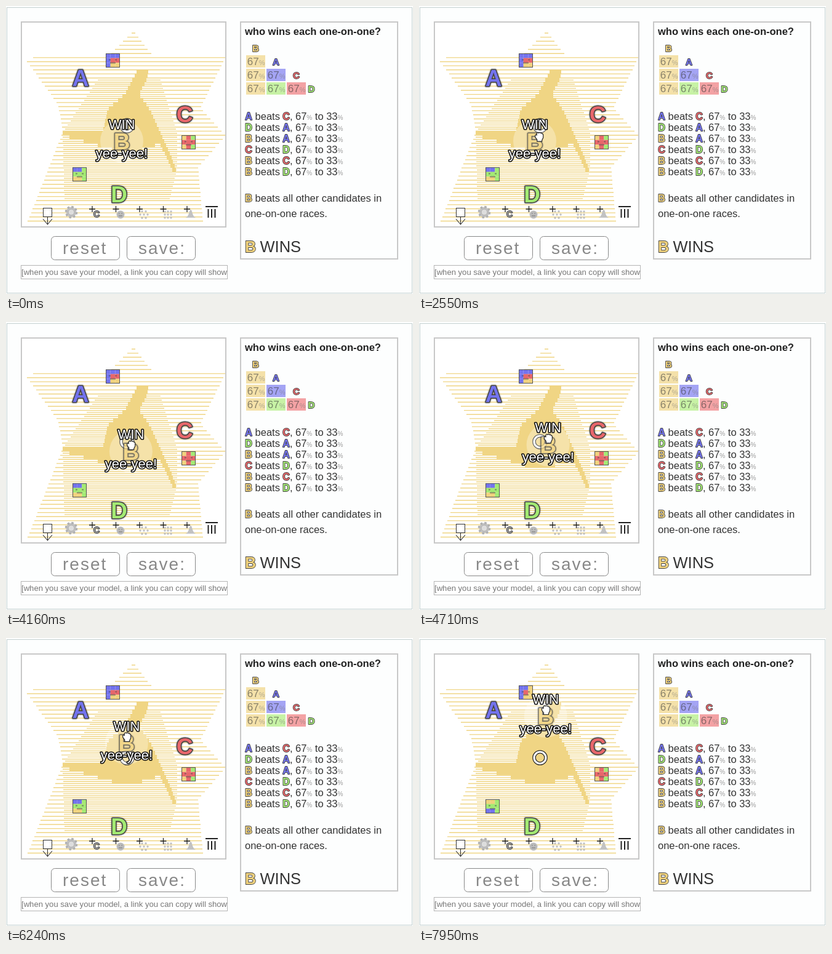
These frames come from a looping animation (661x468 px, 8000 ms). An HTML page:

```html
<!DOCTYPE html>
<html lang="en">
<head>
<meta charset="utf-8">
<title>One-on-one races</title>
<style>
  html, body { margin: 0; width: 100%; height: 100%; overflow: hidden; background: #fdfefe; }
  svg { display: block; width: 661px; height: 468px; }
  text { font-family: "Liberation Sans", Arial, sans-serif; font-size: 16.5px; fill: #333; white-space: pre; }
  .mark { font-weight: bold; stroke: #444; paint-order: stroke; stroke-linejoin: round; text-anchor: middle; }
  .big { filter: drop-shadow(0 0 1px #0008); }
  .note { font-size: 22px; fill: #fff; stroke: #111; stroke-width: 3.2px; paint-order: stroke; stroke-linejoin: round; text-anchor: middle; }
  .pct { font-size: 10px; fill: #999; }
  .cell { font-size: 17px; text-anchor: end; }
  .cell .pct { font-size: 11px; fill: #777; }
  .btn text { font-size: 28px; letter-spacing: 2px; fill: #888; }
  .btn rect { fill: #fff; stroke: #888; }
  .btn.hover text { fill: #555; }
  .btn.hover rect { stroke: #555; }
</style>
</head>
<body>
<svg id="stage" viewBox="0 0 661 468"></svg>
<script>
const LOOP = 8000, TICK = 134.7, GRAB = 3700, ROW = 6.64;
const COLOR = { A: '#7373ee', B: '#f0d27d', C: '#e8676b', D: '#a3ea73' };
const PALE = { A: '#a4a4f4', B: '#f4e1a9', C: '#f3a2a4', D: '#c7f2a5' };
const stage = document.getElementById('stage');

function el(name, attrs = {}, parent = stage, text) {
  const node = document.createElementNS('http://www.w3.org/2000/svg', name);
  for (const k in attrs) node.setAttribute(k, attrs[k]);
  if (text !== undefined) node.textContent = text;
  parent.appendChild(node);
  return node;
}
const group = (attrs, parent) => el('g', attrs, parent);
const box = (x, y, width, height, fill, parent, more) =>
  el('rect', { x, y, width, height, fill, ...more }, parent);
const line = (d, parent, stroke = '#222', width = 1.3) =>
  el('path', { d, fill: 'none', stroke, 'stroke-width': width }, parent);
const circle = (cx, cy, r, fill, parent, more) => el('circle', { cx, cy, r, fill, ...more }, parent);
const label = (x, y, text, parent, style = '') => el('text', { x, y, style }, parent, text);
const place = (node, x, y) => node.setAttribute('transform', `translate(${x.toFixed(1)} ${y.toFixed(1)})`);
const show = (node, on) => node.setAttribute('visibility', on ? 'visible' : 'hidden');

// Fill a polygon with one bar per grid row; thin bars give hatching.
function hatch(outline, height, parent, shift = 0) {
  const pts = outline.split(' ').map(p => p.split(',').map(Number));
  let d = '';
  for (let y = 43.3 + shift; y < 359; y += ROW) {
    const cuts = [];
    pts.forEach(([x1, y1], i) => {
      const [x2, y2] = pts[(i + 1) % pts.length];
      if (y1 <= y !== y2 <= y) cuts.push(Math.round(x1 + (x2 - x1) * (y - y1) / (y2 - y1)));
    });
    cuts.sort((a, b) => a - b);
    for (let i = 0; i + 1 < cuts.length; i += 2)
      d += `M${cuts[i]} ${y.toFixed(2)}H${cuts[i + 1]}v${height}H${cuts[i]}z`;
  }
  el('path', { d, fill: '#f0d584' }, parent);
}

function mark(name, x, y, size, parent, fill = COLOR[name]) {
  return el('text', {
    class: size > 30 ? 'mark big' : 'mark', x, y: y + size * .36,
    style: `font-size:${size}px;fill:${fill};stroke-width:${size > 30 ? 3 : 1.8}px`
  }, parent, name);
}

// A voter's ballot is a 3 by 3 mosaic of candidate colours.
function voter(x, y, ballot) {
  const g = group({ transform: `translate(${x} ${y})` });
  const tiles = [...ballot].map((_, i) => box(i % 3 * 7.67, Math.floor(i / 3) * 7.67, 7.7, 7.7, '', g));
  const paint = list => tiles.forEach((tile, i) => tile.setAttribute('fill', COLOR[list[i]]));
  paint(ballot);
  box(.5, .5, 22, 22, 'none', g, { stroke: '#555' });
  line('M5 10.500h3M15 10.500h3M7 15.500h9', g, '#4448', 2);
  return paint;
}

function button(x, text) {
  const g = group({ class: 'btn' });
  box(x + .5, 374.5, 111, 38, '#fff', g, { rx: 6 });
  label(x + 19, 403, text, g);
  return g;
}

// Page frame, arena and the map of winning positions
box(1.5, 2.5, 658, 464, '#fdfefe', stage, { stroke: '#c3d0d0' });
const frameStyle = { stroke: '#c8c8c8', 'stroke-width': 2 };
box(25, 26, 332, 333, '#fff', stage, frameStyle);
hatch('207,40 240,82 357,82 316,165 357,210 312,262 320,350 35,350 92,205 85,160 33,88 47,82 165,82', 1.4);
hatch('150,118 250,118 278,205 278,262 265,318 95,318 92,205', 1.4, stage, ROW / 2);
hatch('213,102 231,102 229,115 216,140 234,165 248,195 277,262 271,264 250,220 212,232 182,232 92,206 92,202 157,202 165,165 194,138',
  ROW + .1);

// Toolbar
const tools = group();
box(60.5, 328.5, 14, 14, '#fff', tools, { stroke: '#333' });
line('M67.5 343V355M60 346L67.5 355L75 346', tools, '#333', 1.1);
circle(106, 335, 8.5, '#c4c4c4', tools, { stroke: '#b0b0b0', 'stroke-width': 3.6, 'stroke-dasharray': 3.34 });
circle(106, 335, 5, '#ddd', tools, { stroke: '#aaa' });
for (let i = 0; i < 5; i++) line(`M${135 + i * 38.5} 330h10m-5 -5v10`, tools);
mark('C', 147, 338, 14, tools, '#999');
circle(186, 339, 6.5, '#bbb', tools);
line('M183 341h6M183 337h1.500m3 0h1.500', tools, '#777', 1.2);
const dot = (x, y) => circle(x, y, 1.8, '#c2c2c2', tools);
dot(224, 339);
for (let a = 0; a < 6; a++) dot(224 + 6 * Math.cos(a * Math.PI / 3), 339 + 6 * Math.sin(a * Math.PI / 3));
for (let i = 0; i < 9; i++) dot(258 + i % 3 * 5, 334 + Math.floor(i / 3) * 5);
el('path', { d: 'M291 344C298 343 297 331 300 331S302 343 309 344z', fill: '#c2c2c2' }, tools);
line('M324 326h20M328.5 330v14m5.500 0v-14m5.500 0v14', tools, '#222', 2);

// Voters and candidates
const topVoter = voter(162, 77, 'AAAACCABB');
const lowVoter = voter(108, 262, 'AADDDDBBD');
voter(285, 210, 'BCDCCCBCD');
mark('A', 121, 117, 37);
mark('C', 290, 175.5, 37);
mark('D', 183.5, 306, 37);

for (const [stroke, width] of [['#222', 5.6], ['#fff', 3.2]])
  circle(196.5, 194.5, 9.5, 'none', stage, { stroke, 'stroke-width': width });

const winner = group();
circle(0, 0, 35, '#fff', winner, { opacity: .3 });
mark('B', 0, 0, 37, winner).setAttribute('opacity', .72);
el('text', { class: 'note', y: -20 }, winner, 'WIN');
el('text', { class: 'note', y: 27.5 }, winner, 'yee-yee!');

// Buttons and link field
const reset = button(73, 'reset');
button(196, 'save:');
box(25, 421, 334, 24, '#fff', el('clipPath', { id: 'field' }));
box(24.5, 421.5, 335, 22, '#fff', stage, { stroke: '#b5b5b5' });
label(25, 437, '[when you save your model, a link you can copy will show',
  group({ 'clip-path': 'url(#field)' }), 'font-size:13.1px;fill:#777');

// Result panel
box(381, 26, 255, 385, '#fdfefe', stage, frameStyle);
label(388, 47, 'who wins each one-on-one?', stage, 'font-weight:bold;fill:#222');

function score(x, y, shares, parent) {
  const t = label(x, y, '', parent);
  shares.forEach((n, i) => {
    el('tspan', {}, t, (i ? ' to ' : '') + n);
    el('tspan', { class: 'pct' }, t, '%');
  });
  return t;
}

function report(sweep) {
  const g = group(), first = sweep ? 40 : 31;
  const left = c => c ? 359 + first + c * 33 : 390;
  const width = c => c ? 31 : first;
  ['B', 'BA', 'BDC'].forEach((row, r) => [...row].forEach((name, c) => {
    const full = sweep && !r, y = 80 + r * 22;
    box(left(c), y, width(c), 20, (full ? COLOR : PALE)[name], g);
    const t = score(left(c) + width(c) - .5, y + 15.5, [full ? 100 : 67], g);
    t.setAttribute('class', 'cell');
    t.setAttribute('opacity', full ? 1 : .55);
  }));
  [...'BACD'].forEach((name, c) =>
    mark(name, left(c) + (c < 3 ? width(c) / 2 : 7), 69 + c * 21.7, 15, g));
  ['AC', 'DA', 'BA', 'CD', 'BC', 'BD'].forEach(([a, b], i) => {
    const y = 185 + i * 18;
    mark(a, 394, y - 5.5, 16, g);
    label(404.6, y, 'beats', g);
    mark(b, 455, y - 5.5, 16, g);
    label(461, y, ',', g);
    score(470, y, sweep && a + b === 'BA' ? [100, 0] : [67, 33], g);
  });
  return g;
}
const split = report(false), sweep = report(true);
mark('B', 394, 312.5, 16);
label(404.6, 318, 'beats all other candidates in');
label(388, 343, 'one-on-one races.');
mark('B', 397, 391, 25);
label(412.5, 400, 'WINS', stage, 'font-size:25.5px');

// Pointers
const arrow = el('path', { d: 'M0 0V25L5.500 20L10 30L14 28L9.500 18.500H17z', fill: '#000', stroke: '#fff', 'stroke-width': .8 });
const hand = el('path', {
  d: 'M-3.500 8V5L-6.500 1V-2Q-5-4-4-2V-5Q-2-8-1-5.500Q1-8 2-5.500Q4-7 4.500-4.500Q6.500-5 6.500-2V2L4.500 6V8z',
  fill: '#fff', stroke: '#222', 'stroke-width': 1.2, 'stroke-linejoin': 'round'
});

// Pointer key points: time, x, y
const path = [
  [530, 62, 455], [1210, 182, 359], [1620, 223, 264], [2270, 213, 218],
  [2710, 186, 209], [3250, 187, 208], [3640, 194, 203], [4160, 203, 200],
  [4710, 210, 189], [5490, 198, 167], [5970, 196, 169], [7010, 197, 129.5], [7400, 201, 121.5], [7950, 206, 116.5]
];

function pointerAt(t) {
  const i = path.findIndex(k => k[0] >= t);
  if (i < 1) return (i ? path[path.length - 1] : path[0]).slice(1);
  const [t0, x0, y0] = path[i - 1], [t1, x1, y1] = path[i];
  const u = (t - t0) / (t1 - t0);
  return [x0 + (x1 - x0) * u, y0 + (y1 - y0) * u];
}

function draw(ms) {
  const t = Math.floor((ms + 35) / TICK) * TICK;
  const [x, y] = pointerAt(t);
  const hovering = t > 2400;
  place(arrow, x, y);
  place(hand, x, y);
  show(arrow, t > 500 && !hovering);
  show(hand, hovering);
  if (t > GRAB) place(winner, x - .3, y + 10.5);
  else place(winner, 188, 219.5);
  reset.classList.toggle('hover', t > 900 && t < 1300);

  const closer = t > 6850, passed = t > 7120;
  show(split, !closer || passed);
  show(sweep, closer && !passed);
  topVoter(closer ? 'AABACBABB' : 'AAAACCABB');
  lowVoter(passed ? 'BBDDDDAAD' : 'AADDDDBBD');
}

function frame() {
  draw(performance.now() % LOOP);
  requestAnimationFrame(frame);
}
frame();
</script>
</body>
</html>
```
